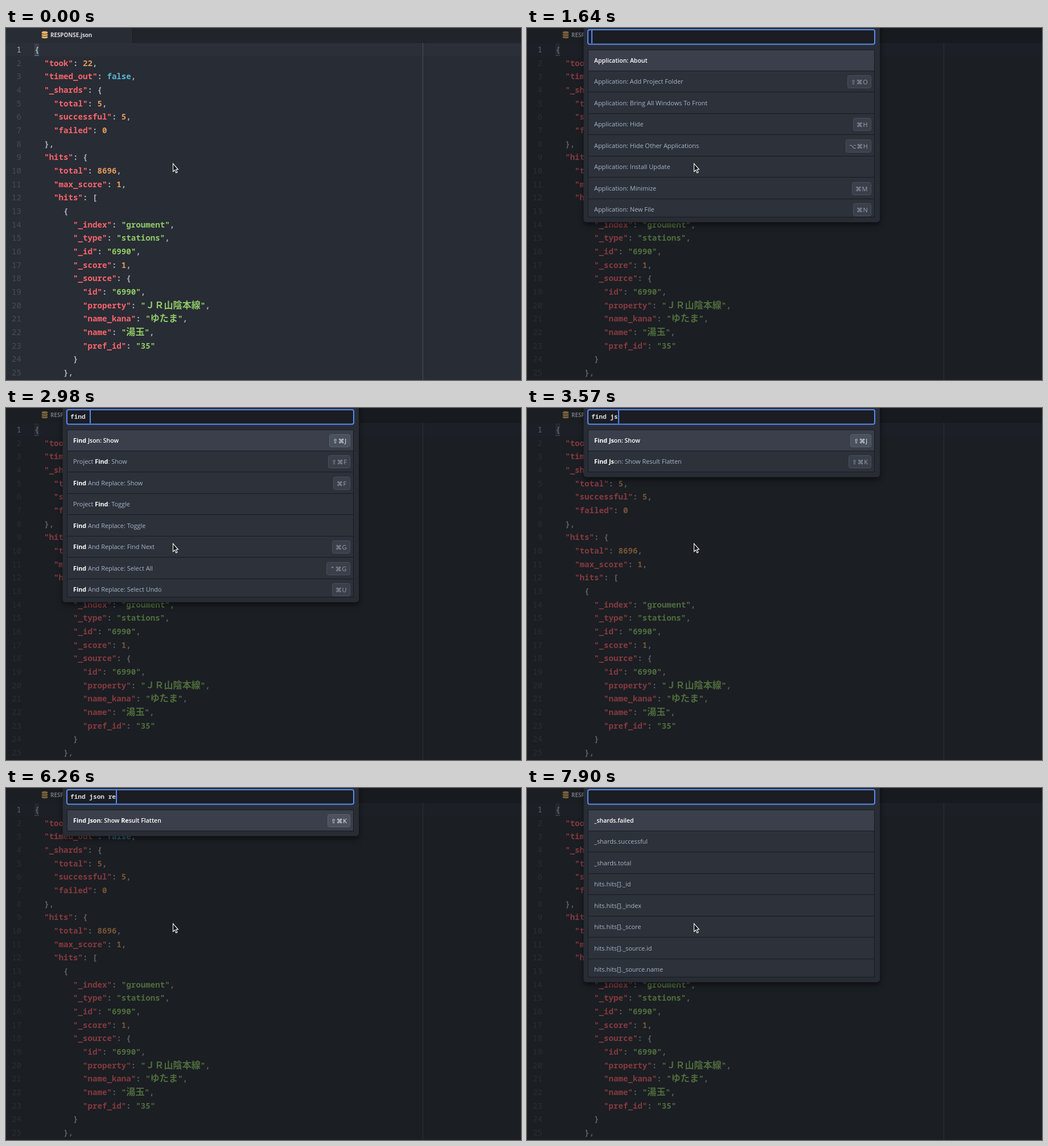
Write an HTML page with a canvas that moves like this. It is 905x619 px and loops after 8 s.

```html
<!DOCTYPE html>
<html lang="en">
<head>
<meta charset="utf-8">
<title>Command palette</title>
<style>
html, body { margin: 0; width: 100%; height: 100%; overflow: hidden; background: #282c34; }
canvas { display: block; }
</style>
</head>
<body>
<canvas id="stage" width="905" height="619"></canvas>
<script>
const ctx = document.getElementById('stage').getContext('2d');
const LOOP = 8000, CELL = 8.48, WIDE = 16.1, LINE = 23.67, ROW = 37.45;
const MONO = '"Noto Sans Mono", "Noto Sans CJK JP", monospace';
const SANS = '"Open Sans", "DejaVu Sans", sans-serif';
const BLUE = '#568af2';

const code = `{
  "took": 22,
  "timed_out": false,
  "_shards": {
    "total": 5,
    "successful": 5,
    "failed": 0
  },
  "hits": {
    "total": 8696,
    "max_score": 1,
    "hits": [
      {
        "_index": "groument",
        "_type": "stations",
        "_id": "6990",
        "_score": 1,
        "_source": {
          "id": "6990",
          "property": "ＪＲ山陰本線",
          "name_kana": "ゆたま",
          "name": "湯玉",
          "pref_id": "35"
        }
      },`.split('\n');

// Each row is "label|shortcut".
const apps = ['About', 'Add Project Folder|⇧⌘O', 'Bring All Windows To Front', 'Hide|⌘H',
  'Hide Other Applications|⌥⌘H', 'Install Update', 'Minimize|⌘M', 'New File|⌘N'].map(s => 'Application: ' + s);
const finds = ['Find Json: Show|⇧⌘J', 'Project Find: Show|⇧⌘F', 'Find And Replace: Show|⌘F',
  'Project Find: Toggle', 'Find And Replace: Toggle', 'Find And Replace: Find Next|⌘G',
  'Find And Replace: Select All|⌃⌘G', 'Find And Replace: Select Undo|⌘U'];
const flatten = ['Find Json: Show Result Flatten|⇧⌘K'];
const jsons = [finds[0], ...flatten];
const keys = ['_shards.failed', '_shards.successful', '_shards.total',
  ...['_id', '_index', '_score', '_source.id', '_source.name'].map(s => 'hits.hits[].' + s)];

// Start time, typed text, list, highlighted query (defaults to the typed text).
const steps = [
  [1640, '', apps], [2530, 'f', apps, ''],
  [2680, 'fi', finds], [2830, 'fin', finds], [2980, 'find ', finds],
  [3280, 'find j', jsons], [3570, 'find js', jsons], [3720, 'find jso', jsons],
  [3870, 'find json', jsons], [4170, 'find json ', jsons], [4470, 'find json r', jsons, 'find json'],
  [4610, 'find json re', flatten], [6860, '', keys]
];
const caretOff = [[0, 440], [740, 1640], [1940, 2380], [5060, 5510], [5960, 6260], [7150, 7600], [7900, 8000]];

function rect(x, y, w, h, color) {
  ctx.fillStyle = color;
  ctx.fillRect(x, y, w, h);
}

function roundRect(x, y, w, h, r, fill, stroke, width = 1) {
  ctx.beginPath();
  ctx.roundRect(x, y, w, h, r);
  ctx.fillStyle = fill;
  ctx.fill();
  if (stroke) {
    ctx.strokeStyle = stroke;
    ctx.lineWidth = width;
    ctx.stroke();
  }
}

function text(str, x, y, color, font) {
  ctx.font = font;
  ctx.fillStyle = color;
  ctx.fillText(str, x, y);
  return x + ctx.measureText(str).width;
}

function cells(str, x, y, color, weight = 600, cell = CELL, size = 14.12) {
  for (const ch of str) {
    const wide = ch > '\u2fff';
    text(ch, x, y, color, `${weight} ${wide ? 16 : size}px ${MONO}`);
    x += wide ? WIDE : cell;
  }
  return x;
}

function tokenColor(token, next) {
  if (token[0] === '"') return next === ':' ? '#f9646c' : '#8fca67';
  if (/\d/.test(token)) return '#e09a5a';
  return /[a-z]/.test(token) ? '#56b6d6' : '#abb2bf';
}

function drawTab() {
  rect(0, 0, 905, 26, '#21252b');
  rect(0, 0, 222, 26, '#282c34');
  rect(222, 0, 1, 26, '#181a1f');
  rect(223, 25, 682, 1, '#1b1e23');
  ctx.fillStyle = '#e8b565';
  for (const y of [16, 12, 8]) {
    ctx.beginPath();
    ctx.ellipse(68, y, 6, 2.8, 0, 0, Math.PI * 2);
    ctx.fill();
    ctx.strokeStyle = '#282c34';
    ctx.lineWidth = 0.8;
    ctx.stroke();
  }
  text('RESPONSE.json', 78, 15.5, '#d7dae0', `700 9.8px ${SANS}`);
}

function drawEditor(caret) {
  rect(0, 0, 905, 619, '#282c34');
  rect(0, 26, 905, 24, '#2a2f38');
  rect(732, 26, 1, 593, '#4a4e56');
  rect(50, 27, 8, 22, '#3b414c');
  rect(50, 48, 8, 1, '#6882b4');
  code.forEach((line, i) => {
    const y = 43 + i * LINE, number = String(i + 1);
    cells(number, 27 - number.length * CELL, y, i ? '#474d59' : '#abb2bf', 400);
    let x = 50.2;
    for (const m of line.matchAll(/"[^"]*"|\d+|[a-z]+|./gu))
      x = cells(m[0], x, y, tokenColor(m[0], line[m.index + m[0].length]));
  });
  if (caret) rect(50, 26, 2, 23, '#528bff');
  drawTab();
}

function drawLabel(label, query, y, selected) {
  const font = selected ? `600 10.5px ${SANS}` : `400 10.95px ${SANS}`;
  const color = selected ? '#ffffff' : '#a9b4c6';
  let x = 118, from = 0;
  const plain = to => {
    x = text(label.slice(from, to), x, y, color, font);
    from = to;
  };
  for (const word of query.split(' ').filter(Boolean)) {
    const at = label.toLowerCase().indexOf(word, from);
    if (at < 0) continue;
    plain(at);
    from = at + word.length;
    x = text(label.slice(at, from), x, y, '#ffffff', `700 10.8px ${SANS}`);
  }
  plain(label.length);
}

function drawShortcut(keys, y, selected) {
  ctx.font = `11px ${SANS}`;
  ctx.letterSpacing = '0.5px';
  const w = Math.round(ctx.measureText(keys).width + 11), x = 604.5 - w;
  roundRect(x, y - 11, w, 22, 3, selected ? '#4b515d' : '#3a3f4a', selected ? '#5a606c' : '#4a505b');
  text(keys, x + 5.5, y + 4, selected ? '#eceef2' : '#98a1b0', ctx.font);
  ctx.letterSpacing = '0px';
}

function drawPalette([, typed, list, query = typed], caret) {
  const bottom = Math.min(333, Math.round(38.5 + ROW * list.length));
  rect(0, 0, 905, 619, 'rgba(14,16,18,0.5)');
  ctx.save();
  ctx.shadowColor = 'rgba(0,0,0,0.5)';
  ctx.shadowBlur = 10;
  ctx.shadowOffsetY = 5;
  roundRect(99.5, -20, 520.5, bottom + 28.5, 5, '#282c34');
  ctx.restore();

  roundRect(107, 3, 504, 25.5, 3, '#1b1d23', BLUE, 2);
  const end = cells(typed, 113, 19, '#d7dae0', 600, 6.67, 11.1);
  if (caret) rect(Math.round(end + 0.4), 4, 2, 23, BLUE);

  ctx.save();
  ctx.beginPath();
  ctx.rect(107, 38, 504, bottom - 38);
  ctx.clip();
  list.forEach((row, i) => {
    const [label, shortcut] = row.split('|');
    const top = Math.round(38.5 + i * ROW), y = 57 + i * ROW;
    rect(107, top, 504, 38, i ? '#2c313a' : '#3a3f4b');
    rect(107, Math.round(38.5 + (i + 1) * ROW) - 1, 504, 1, '#181a1f');
    drawLabel(label, query, y + 4, !i);
    if (shortcut) drawShortcut(shortcut, Math.round(y) + 0.5, !i);
  });
  ctx.restore();
  ctx.strokeStyle = '#181a1f';
  ctx.lineWidth = 1;
  ctx.strokeRect(107.5, 38.5, 503, bottom - 39);
}

function drawPointer() {
  const arrow = new Path2D('M293.5 238.5V252.5L296.6 249.6L298.8 254.8L301 253.8L298.8 248.8H302.5Z');
  ctx.fillStyle = '#111';
  ctx.fill(arrow);
  ctx.strokeStyle = '#fff';
  ctx.lineWidth = 1.1;
  ctx.stroke(arrow);
}

function draw(now) {
  const t = now % LOOP;
  const step = steps.findLast(s => t >= s[0]);
  const caret = !caretOff.some(([from, to]) => t >= from && t < to);
  drawEditor(caret && !step);
  if (step) drawPalette(step, caret);
  drawPointer();
}

const start = performance.now();
function tick() {
  draw(performance.now() - start);
  requestAnimationFrame(tick);
}
tick();
</script>
</body>
</html>
```
